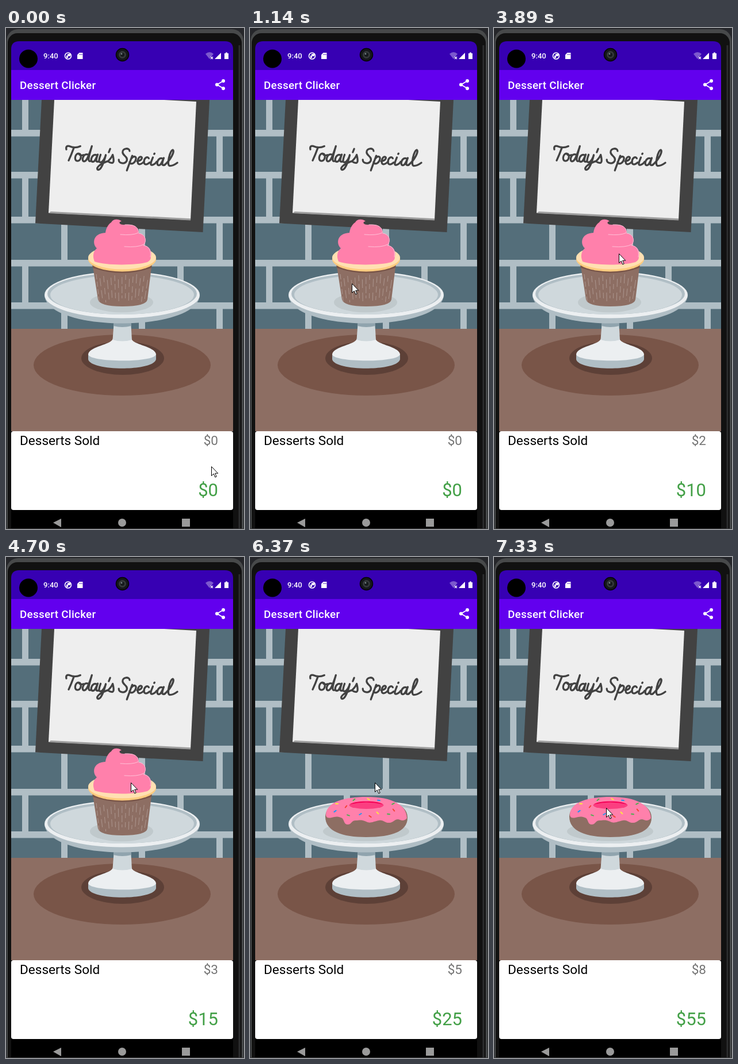
Recreate the animation shown at these times as an HTML page. Size 414x871 px, loop 8 s.

```html
<!DOCTYPE html>
<html lang="en">
<head>
<meta charset="utf-8">
<title>Dessert Clicker</title>
<style>
html, body { margin: 0; width: 100%; height: 100%; overflow: hidden; background: #111; }
svg { display: block; width: 100%; height: 100%; font-family: Roboto, sans-serif; }
.line { fill: none; stroke-linecap: round; stroke-linejoin: round; }
</style>
</head>
<body>
<svg viewBox="0 0 414 871">
  <defs>
    <clipPath id="sceneClip"><rect x="9" y="125" width="386" height="576"/></clipPath>
    <path id="letterA" d="M157 218C149 215 145 230 151 230C155 230 157 222 159 217C156 227 156 231 161 229"/>
  </defs>

  <!-- phone body -->
  <rect width="414" height="871" fill="#25262a"/>
  <rect x="1" y="2" width="412" height="900" rx="20" fill="#47494a"/>
  <rect x="3" y="9" width="407" height="900" rx="17" fill="#111"/>
  <path d="M406 30V871" stroke="#2c2d2e" stroke-width="3"/>
  <rect x="9" y="690" width="386" height="181" fill="#000"/>

  <!-- status bar -->
  <path d="M9 74V37Q9 23 23 23H381Q395 23 395 37V74Z" fill="#3700b3"/>
  <circle cx="39" cy="53.500" r="16" fill="#000"/>
  <text x="65" y="53" font-size="13.100" font-weight="500" fill="#fff">9:40</text>
  <circle cx="108" cy="48.500" r="5.500" fill="none" stroke="#fff" stroke-width="1.600"/>
  <path d="M107 45H112V49H108V52H105V48H107Z" fill="#fff"/>
  <path d="M127.500 43H133.500V54H124V46.500Z" fill="#fff"/>
  <path d="M128 45V47M130 45V47M132 45V47" stroke="#3700b3" stroke-width=".8"/>
  <circle cx="202.500" cy="46.500" r="11" fill="#15171a" stroke="#050505" stroke-width="1.500"/>
  <circle cx="202.500" cy="46.500" r="6.500" fill="#34383a"/>
  <circle cx="202.500" cy="46.500" r="3.500" fill="#15191b"/>
  <circle cx="201" cy="45" r="1.400" fill="#748084"/>
  <path d="M347 45Q354 39 361 45L354 54Z" fill="#fff" opacity=".35"/>
  <path d="M356 50L360 54M360 50L356 54" stroke="#fff" stroke-width="1.200"/>
  <path d="M363 54L374 43V54Z" fill="#fff"/>
  <path d="M380 44H382V42.500H385V44H387V54H380Z" fill="#fff"/>

  <!-- app bar -->
  <rect x="9" y="73" width="386" height="52" fill="#6200ee"/>
  <text x="24" y="106" font-size="18.800" font-weight="500" letter-spacing=".3" fill="#fff">Dessert Clicker</text>
  <g fill="#fff">
    <path d="M378 92L367 98.500L378 105" class="line" stroke="#fff" stroke-width="1.800"/>
    <circle cx="378" cy="92" r="3"/><circle cx="367" cy="98.500" r="3"/><circle cx="378" cy="105" r="3"/>
  </g>

  <g clip-path="url(#sceneClip)">
    <rect x="9" y="125" width="386" height="400" fill="#546e7a"/>
    <g id="mortar" fill="#b0bec5"/>
    <rect x="9" y="523" width="386" height="178" fill="#8d6e63"/>

    <!-- sign -->
    <path d="M62 125H354L342.500 355L51 339.500Z" fill="#424242"/>
    <path d="M84 125H275L331 128L321 334L74 321.500Z" fill="#eee"/>
    <path d="M74 322L78 319L321.200 331.200L321 334.500Z" fill="#9e9e9e"/>
    <g class="line" stroke="#424242" stroke-width="3.300" transform="rotate(3 102 230)">
      <path d="M104 211Q102 204 109 205Q119 209 128 204M117 207Q113 220 109 230"/>
      <path d="M126 217C119 217 118 230 124 230C131 230 132 217 126 217Q128 222 134 219"/>
      <path d="M142 218C134 215 130 230 136 230C140 230 143 222 148 203C144 220 141 231 147 229"/>
      <use href="#letterA"/>
      <path d="M164 217C161 227 161 231 165 230C169 229 172 222 173 217C170 232 165 246 160 243C157 239 166 232 176 228"/>
      <path d="M180 206L178 212M177 228Q183 222 185 216Q190 232 183 230Q180 230 178 228"/>
      <path d="M214 208C214 202 201 203 202 211C203 217 212 218 210 225C207 232 196 231 196 224"/>
      <path d="M219 216L211 242M217 222C222 214 228 217 225 224C222 231 216 231 215 227"/>
      <path d="M228 225C236 224 238 217 234 217C229 217 227 230 232 230Q236 230 240 225"/>
      <path d="M248 219C246 215 240 218 240 225C240 232 246 230 250 226"/>
      <path d="M255 217C251 228 251 231 255 230Q259 229 262 224M257 211L257.500 210"/>
      <use href="#letterA" x="115"/>
      <path d="M276 229C286 220 293 204 289 202C284 203 279 230 285 230Q291 230 298 224"/>
    </g>

    <!-- table shadows and stand -->
    <ellipse cx="202" cy="586" rx="154" ry="53" fill="#795548"/>
    <ellipse cx="203" cy="574" rx="72" ry="29" fill="#5d4037"/>
    <path d="M143 567V576C147 597 257 597 261 576V567Z" fill="#b0bec5"/>
    <path d="M186 540C183 551 146 553 143 567C143 582 261 582 261 567C258 553 221 551 218 540Z" fill="#eceff1"/>
    <path d="M188 508H217L219 542Q202 547 185.500 542Z" fill="#cfd8dc"/>
    <path d="M188 508H217L217.700 518Q202 522 187.300 518Z" fill="#90a4ae"/>
    <path d="M67 464C70 530 334 530 337 464Z" fill="#b0bec5"/>
    <ellipse cx="202" cy="464" rx="135" ry="40.500" fill="#eceff1"/>
    <ellipse cx="202" cy="462" rx="130" ry="36" fill="#b0bec5"/>
    <ellipse cx="202" cy="464" rx="125" ry="34" fill="#cfd8dc"/>

    <g id="cupcake">
      <ellipse cx="201" cy="477" rx="55" ry="17.500" fill="#c0c9cc"/>
      <path d="M150 408H254L246 472Q244 484 202 484Q163 484 160 472Z" fill="#8d6e63"/>
      <g id="pleats" stroke="#bcaaa4" stroke-width=".9"/>
      <path d="M150 410H254L253 417Q202 435 151 417Z" fill="#795548"/>
      <ellipse cx="202" cy="402" rx="59" ry="21.500" fill="#ffcc80"/>
      <ellipse cx="202" cy="399" rx="59" ry="20.500" fill="#ffe0b2"/>
      <path d="M154 406C150 396 152 388 158 383C150 376 150 357 173 356C174 348 178 341 183 338C186 332 195 331 201 336C195 337 197 342 204 342H214C225 342 231 348 231 357C242 358 246 369 240 378C250 379 254 388 252 398Q252 404 246 407C225 413 172 413 154 406Z" fill="#ff80ab"/>
      <path class="line" d="M207 342C225 341 231 348 230 356Q220 361 199 359M231 357C242 358 245 369 240 376Q229 382 206 380M239 378C249 379 253 388 251 398" stroke="#ffc1d8" stroke-width="1"/>
    </g>

    <g id="donut">
      <ellipse cx="202" cy="477" rx="75" ry="17" fill="#c0c9cc"/>
      <path d="M131 450C133 427 165 422 202 422C243 422 273 429 274 452C275 477 247 487 202 487C160 487 130 477 131 450Z" fill="#8d6e63"/>
      <path d="M132 449C132 425 166 417 203 417C242 417 272 428 273 454Q268 460 261 457C253 453 250 462 243 462C234 463 233 456 224 458C214 460 209 464 202 460C193 456 190 458 184 458C176 458 177 465 170 465C162 465 165 455 158 453C150 450 147 452 142 453Q133 455 132 449Z" fill="#ff80ab"/>
      <ellipse cx="202.500" cy="431.500" rx="30" ry="6.500" fill="#fb3e80"/>
      <path d="M174 430C180 423 225 423 231 430Q202 423 174 430Z" fill="#f50057"/>
      <g id="sprinkles" class="line" stroke-width="2"/>
    </g>
  </g>

  <!-- totals -->
  <rect x="9" y="701" width="386" height="137" rx="4" fill="#fff"/>
  <text x="24" y="725" font-size="22.550" fill="#000">Desserts Sold</text>
  <text id="sold" x="369" y="725" font-size="22.550" text-anchor="end" fill="#757575"></text>
  <text id="revenue" x="369" y="814" font-size="31" text-anchor="end" fill="#43a047"></text>

  <!-- navigation -->
  <g fill="#9a9a9a">
    <path d="M82 860L96 853V868Z"/><circle cx="202" cy="860" r="7"/><rect x="306" y="853" width="14" height="14"/>
  </g>
  <path d="M0 870.500H414" stroke="#3a3a3c"/>

  <path id="cursor" d="M.5 .5V16.500L4.200 13L6.800 19L9.200 18L6.700 12.200H11.700Z" fill="#fff" stroke="#000" stroke-width="1"/>
</svg>
<script>
const LOOP = 8000;
const $ = id => document.getElementById(id);

function add(parent, tag, attrs) {
  const node = document.createElementNS("http://www.w3.org/2000/svg", tag);
  for (const key in attrs) node.setAttribute(key, attrs[key]);
  $(parent).append(node);
}

// Staggered brick courses
[177, 250, 328, 403, 477].forEach(y => add("mortar", "rect", { x: 9, y, width: 386, height: 11.5 }));
[[125, 177], [188, 250], [261, 328], [339, 403], [414, 477], [488, 523]].forEach(([top, bottom], row) => {
  for (let x = row % 2 ? 96 : 28; x < 395; x += 135)
    add("mortar", "rect", { x, y: top, width: 11, height: bottom - top });
});

// Broken pleats that narrow toward the base
for (let i = 0; i < 15; i++) {
  const x = 157 + i * 6.4, top = 428 + (i * 7) % 11, lean = (202 - x) * 0.12;
  add("pleats", "path", {
    d: `M${x} ${top}L${x + lean} ${478 - (i * 5) % 9}`,
    "stroke-dasharray": `${9 + (i * 5) % 8} ${4 + (i * 3) % 7}`,
    opacity: 0.75
  });
}

const colors = { y: "#ffeb3b", g: "#4caf50", b: "#2196f3", r: "#f44336" };
[["y", 151, 429, 0], ["g", 181, 422, -40], ["y", 206, 421, 30], ["b", 224, 423, 10],
 ["b", 148, 442, -35], ["r", 167, 434, -50], ["g", 171, 449, 20], ["b", 192, 447, -30],
 ["y", 222, 445, 45], ["g", 249, 429, -25], ["r", 250, 440, 50], ["r", 209, 451, 35],
 ["g", 241, 447, 10]].forEach(([c, x, y, turn]) =>
  add("sprinkles", "path", { d: "M-2 0H2", stroke: colors[c], transform: `translate(${x} ${y}) rotate(${turn})` }));

// Each entry holds from its time until the next one
const pointer = [
  [0, 357, 762], [900, 318, 690], [1020, 216, 510], [1140, 177, 444],
  [1260, 215, 394], [1410, 217, 392], [7180, 214, 403], [7330, 195, 436]
];
const sales = [
  [0, 0, 0], [1940, 1, 5], [3890, 2, 10], [4700, 3, 15],
  [6060, 4, 20], [6370, 5, 25], [6800, 7, 45], [6920, 8, 55]
];
const at = (steps, t) => steps.findLast(step => step[0] <= t);

function render(t) {
  const [, x, y] = at(pointer, t);
  const [, count, total] = at(sales, t);
  $("cursor").setAttribute("transform", `translate(${x} ${y})`);
  $("sold").textContent = "$" + count;
  $("revenue").textContent = "$" + total;
  $("cupcake").style.display = count < 5 ? "" : "none";
  $("donut").style.display = count < 5 ? "none" : "";
}

const start = performance.now();
function frame() {
  render((performance.now() - start) % LOOP);
  requestAnimationFrame(frame);
}
frame();
</script>
</body>
</html>
```
